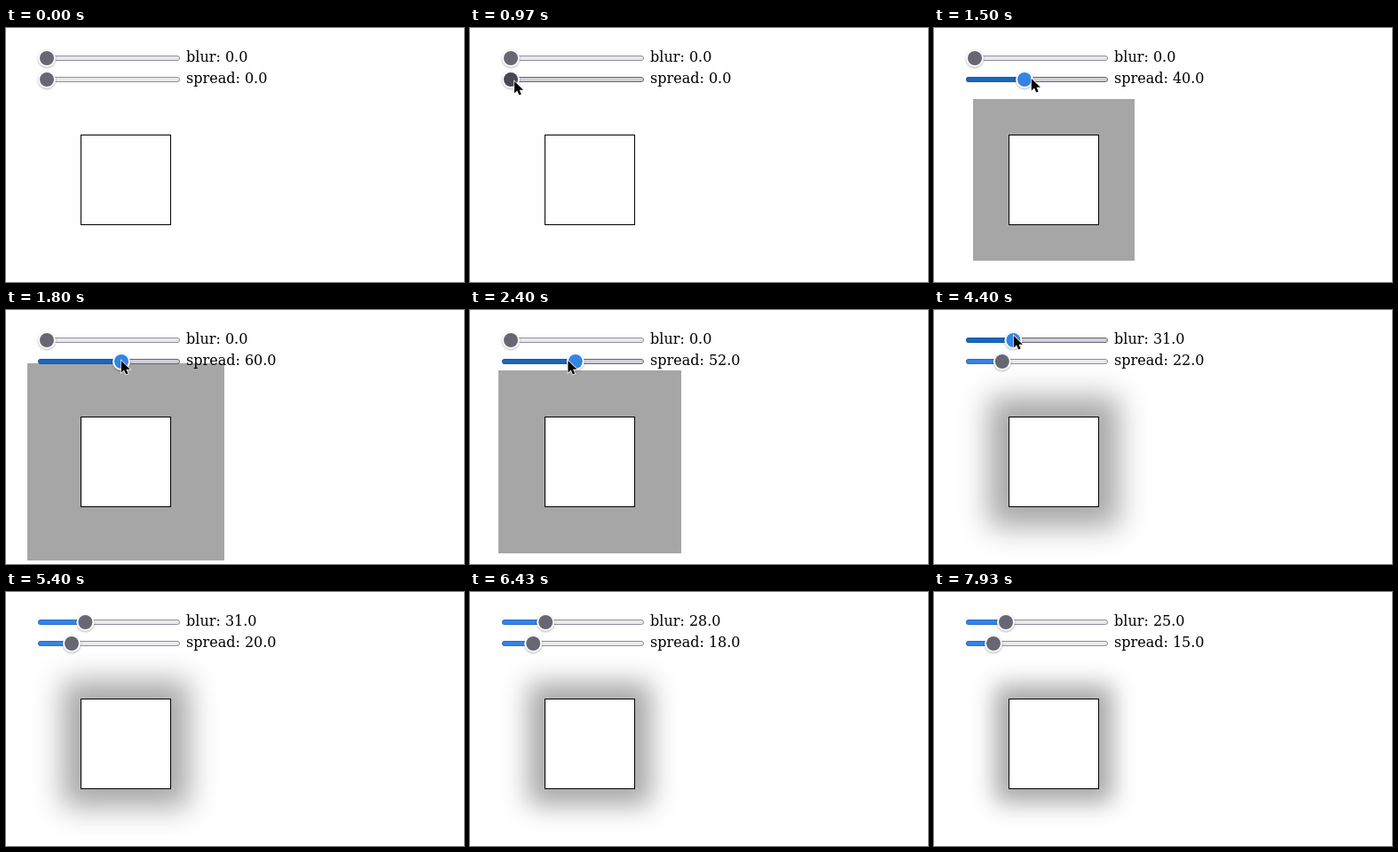
An HTML page for the animation above (8 s loop, 516 px wide and 286 px high).

```html
<!DOCTYPE html>
<html lang="en">
<head>
<meta charset="utf-8">
<title>Box shadow sliders</title>
<style>
  html, body { margin: 0; width: 100%; height: 100%; overflow: hidden; background: #fff; }
  #box { position: absolute; left: 84px; top: 120px; width: 100px; height: 100px; border: 1px solid #000; background: #fff; }
  svg { position: absolute; left: 0; top: 0; }
  text { font: 16px "DejaVu Serif", "Noto Serif", serif; }
  .track { fill: #e9e9ed; stroke: #8f8f9d; }
  .fill { fill: #3584e4; stroke: #2a6fc8; }
  .rim { fill: #fff; filter: drop-shadow(0 1px 1px rgba(0, 0, 0, .3)); }
  .knob { fill: #676774; }
  .hover .track, .active .track { fill: #d0d0d7; stroke: #676774; }
  .hover .fill { fill: #1c6bc8; stroke: #1a62b6; }
  .hover .knob { fill: #484851; }
  .active .fill { fill: #1a66bd; stroke: #155cad; }
  .active .knob { fill: #3584e4; }
</style>
</head>
<body>
<div id="box"></div>
<svg id="stage" width="516" height="286">
  <path id="cursor" d="M0 0V13.5L3.2 10.6 5.4 15.6 7.8 14.5 5.6 9.7H10Z" stroke="#fff" stroke-width="1.4" paint-order="stroke"/>
</svg>
<script>
const LOOP = 8000, STEP = 100 / 3, TICK = 503, UNIT = 1.4;
const stage = document.getElementById('stage');
const box = document.getElementById('box');
const cursor = document.getElementById('cursor');

function add(parent, tag, attrs) {
  const el = document.createElementNS('http://www.w3.org/2000/svg', tag);
  for (const key in attrs) el.setAttribute(key, attrs[key]);
  return parent.appendChild(el);
}

function makeSlider(name, y) {
  const g = add(stage, 'g', {});
  const bar = { x: 36.5, y: y - 2.5, width: 159, height: 5, rx: 2.5 };
  add(g, 'rect', { ...bar, class: 'track' });
  const fill = add(g, 'rect', { ...bar, class: 'fill' });
  const rim = add(g, 'circle', { cy: y, r: 10, class: 'rim' });
  const knob = add(g, 'circle', { cy: y, r: 8, class: 'knob' });
  const label = add(g, 'text', { x: 203.1, y: y + 4 });
  return (value, state) => {
    const x = 46 + UNIT * value;
    g.setAttribute('class', state);
    fill.setAttribute('width', x - 36.5);
    fill.style.display = value ? '' : 'none';
    rim.setAttribute('cx', x);
    knob.setAttribute('cx', x);
    label.textContent = `${name}: ${value.toFixed(1)}`;
  };
}

const easeOut = u => 1 - (1 - u) ** 3.5;
const easeInOut = u => u < .5 ? (2 * u) ** 2.7 / 2 : 1 - (2 - 2 * u) ** 2.7 / 2;

// Eased progress from 0 to 1 of a move
const glide = (t, start, length, ease = easeOut) =>
  ease(Math.min(1, Math.max(0, (t - start) / length)));

// How far each drag has moved its value since the press
const spreadDrag = t => 57 * glide(t, 1370, 500) - 35 * glide(t, 2250, 400, easeInOut);
const blurDrag = t => 29 * glide(t, 4130, 430);

// A released value loses one unit per tick
const decay = (t, from) => Math.max(0, Math.floor((t - from) / TICK));

const pressed = (t, at, drag) => t < at ? 0 : Math.round(3 + drag(t));
const spreadAt = t => pressed(t, 1190, spreadDrag) - decay(t, 2865);
const blurAt = t => pressed(t, 3895, blurDrag) - decay(t, 4374 + STEP);

function stateAt(t, enter, press, release, leave) {
  if (t < enter || t >= leave) return '';
  return t >= press && t < release ? 'active' : 'hover';
}

// While dragging, the pointer runs one step ahead of the thumb
const cursorX = t => 98 - 62 * glide(t, 200, 330) + 14 * glide(t, 730, 240)
  - 26 * glide(t, 3170, 90) - 5 * glide(t, 3340, 230)
  + UNIT * (spreadDrag(t + STEP) + blurDrag(t + STEP));
const cursorY = t => 288 - 225 * glide(t, 200, 330) - 3 * glide(t, 730, 240)
  - 3 * glide(t, 1370, 130) - 24 * glide(t, 3170, 90) - 4 * glide(t, 4130, 270);

const drawBlur = makeSlider('blur', 34);
const drawSpread = makeSlider('spread', 58);
stage.append(cursor);

function draw() {
  const t = Math.floor((performance.now() % LOOP + 4) / STEP) * STEP;
  const blur = blurAt(t), spread = spreadAt(t);
  drawBlur(blur, stateAt(t, 3230, 3860, 4830, 4890));
  drawSpread(spread, stateAt(t, 830, 1160, 3180, 3180));
  box.style.boxShadow = `0 0 ${blur}px ${spread}px rgba(0, 0, 0, .35)`;
  cursor.setAttribute('transform', `translate(${cursorX(t)} ${cursorY(t)})`);
  cursor.style.display = t > 195 && t < 4890 ? '' : 'none';
  requestAnimationFrame(draw);
}
draw();
</script>
</body>
</html>
```
